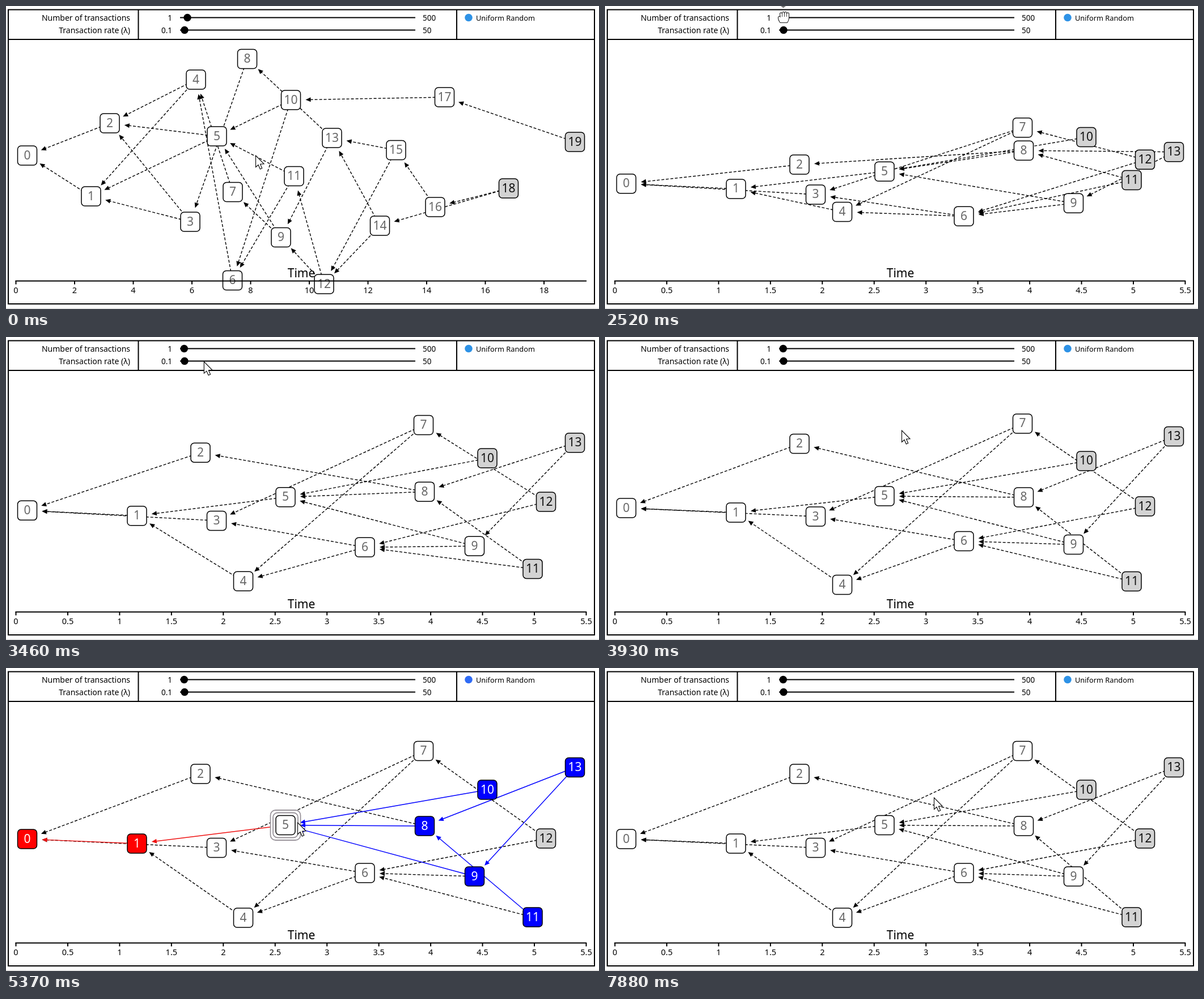
Write an HTML page with a canvas that moves like this. It is 1046 px wide and 535 px high and loops after 7.99 s.

```html
<!DOCTYPE html>
<html lang="en">
<head>
<meta charset="utf-8">
<title>Transaction graph</title>
<style>
html, body { margin: 0; width: 100%; height: 100%; overflow: hidden; background: #fff; }
canvas { display: block; }
</style>
</head>
<body>
<canvas id="stage" width="1046" height="535"></canvas>
<script>
const ctx = document.getElementById('stage').getContext('2d');
const LOOP = 7990, REBUILD = 2370;
const BLACK = '#000', RED = '#ff0000', BLUE = '#0000ff';
const FONT = '"Noto Sans", "Open Sans", sans-serif';

// Parents of each node, by index
const wide = {
  x: [37.5, 150, 183, 325, 335, 372, 399.5, 400, 425.5, 485, 502.5, 508, 561, 575, 659.5, 688, 757, 773.5, 886.5, 1003.5],
  y: [264, 336, 207, 381, 130, 230, 484.5, 328.5, 93.5, 408.5, 166, 300.5, 491, 233, 388, 254.5, 355, 161, 322, 240],
  parents: [[], [0], [0], [1, 2], [1, 2], [1, 2], [4], [4], [3], [5, 7], [5, 6], [5, 6], [9, 11],
    [8, 9], [12, 13], [12, 13], [15], [10], [14, 16], [17]],
  step: 2, count: 10, gap: 103.5
};
const small = {
  x: [37.5, 231, 343, 371.5, 418.5, 493, 633, 736.5, 738.5, 826.5, 849, 929, 952.5, 1003.5],
  parents: [[], [0], [0], [0], [1], [1], [3, 4], [3, 4], [2, 5], [5, 6], [5], [6, 8], [6, 7], [8, 9]],
  step: 0.5, count: 12, gap: 91.45
};
const early = [325, 340, 271, 356, 405, 290.5, 417.5, 166, 231, 380.5, 193, 315, 257, 235];
const late = [302, 310, 188.5, 317, 437.5, 281, 360.5, 153, 283, 366.5, 219, 431.5, 299, 175.5];
const rest = [302, 310, 187, 317.5, 441, 277.5, 362, 146.5, 279, 368, 215, 440, 301, 175.5];

// time, x, y of the pointer tip
const pointerPath = [
  [0, 440, 264], [380, 440, 264], [1160, 332, 38], [1250, 332, 38], [1550, 313, 20],
  [1780, 313, 20], [1800, 313, 21], [1950, 317, 20], [2040, 311, 20], [2110, 311, 20],
  [2370, 315, 20], [3300, 315, 20], [3930, 523, 165], [4120, 523, 165], [4850, 506, 272],
  [5340, 506, 272], [5370, 514, 273], [5460, 514, 273], [6160, 627, 356], [6250, 627, 356],
  [6400, 630, 350], [7470, 630, 350], [7880, 580, 229], [LOOP, 580, 229]
];

const clamp = v => Math.max(0, Math.min(1, v));
const lerp = (a, b, p) => a + (b - a) * p;
const smooth = p => p * p * (3 - 2 * p);
const between = (t, a, b) => clamp((t - a) / (b - a));
const settle = (p, k) => (1 - Math.exp(-k * p)) / (1 - Math.exp(-k));

function pointerAt(t) {
  let i = 1;
  while (i < pointerPath.length - 1 && t > pointerPath[i][0]) i++;
  const a = pointerPath[i - 1], b = pointerPath[i];
  const p = smooth(between(t, a[0], b[0]));
  return [lerp(a[1], b[1], p), lerp(a[2], b[2], p)];
}

function heights(t) {
  if (t < 2900) {
    const p = between(t, REBUILD, 2900);
    return early.map(y => lerp(295 + (y - 295) * 0.4, y, settle(p, 0.8)));
  }
  if (t < 3930) {
    const p = settle(between(t, 2900, 3930), 2.5);
    return early.map((y, i) => lerp(y, late[i], p));
  }
  const p = settle(between(t, 3930, 4850), 2);
  return late.map((y, i) => lerp(y, rest[i], p));
}

function relatives(g, id) {
  const up = new Set(), down = new Set();
  if (id < 0) return { up, down };
  const climb = n => g.parents[n].forEach(p => { up.add(p); climb(p); });
  climb(id);
  g.parents.forEach((ps, n) => {
    if (ps.some(p => p === id || down.has(p))) down.add(n);
  });
  return { up, down };
}

function line(x1, y1, x2, y2, color = BLACK, width = 2) {
  ctx.strokeStyle = color;
  ctx.lineWidth = width;
  ctx.beginPath();
  ctx.moveTo(x1, y1);
  ctx.lineTo(x2, y2);
  ctx.stroke();
}

function text(str, x, y, size, align = 'left', color = BLACK) {
  ctx.font = size + 'px ' + FONT;
  ctx.textAlign = align;
  ctx.fillStyle = color;
  ctx.fillText(str, x, y);
}

function dot(x, y, r, color = BLACK) {
  ctx.fillStyle = color;
  ctx.beginPath();
  ctx.arc(x, y, r, 0, Math.PI * 2);
  ctx.fill();
}

function box(x, y, size, radius, stroke, width, fill) {
  ctx.beginPath();
  ctx.roundRect(x - size / 2, y - size / 2, size, size, radius);
  if (fill) {
    ctx.fillStyle = fill;
    ctx.fill();
  }
  ctx.strokeStyle = stroke;
  ctx.lineWidth = width;
  ctx.stroke();
}

function polygon(points, fill) {
  ctx.beginPath();
  points.forEach(([x, y]) => ctx.lineTo(x, y));
  ctx.closePath();
  ctx.fillStyle = fill;
  ctx.fill();
}

function edge(x1, y1, x2, y2, color) {
  const angle = Math.atan2(y2 - y1, x2 - x1);
  const length = Math.hypot(x2 - x1, y2 - y1) - 26;
  ctx.save();
  ctx.translate(x1, y1);
  ctx.rotate(angle);
  ctx.setLineDash(color === BLACK ? [5, 3] : []);
  line(0, 0, length - 7, 0, color, 1.4);
  polygon([[length, 0], [length - 9, -4], [length - 9, 4]], color);
  ctx.restore();
}

function drawGraph(g, ys, pointer) {
  const hover = g === small
    ? g.x.findIndex((x, i) => Math.abs(pointer[0] - x) < 26 && Math.abs(pointer[1] - ys[i]) < 26)
    : -1;
  const { up, down } = relatives(g, hover);
  const tips = new Set(g.x.keys());
  const edges = [];
  g.parents.forEach((ps, n) => ps.forEach(p => {
    tips.delete(p);
    let color = BLACK;
    if (hover >= 0 && (n === hover || up.has(n))) color = '#ee1212';
    else if (hover >= 0 && (p === hover || down.has(p))) color = BLUE;
    edges.push([n, p, color]);
  }));
  edges.sort((a, b) => (b[2] === BLACK) - (a[2] === BLACK));
  edges.forEach(([n, p, color]) => edge(g.x[n], ys[n], g.x[p], ys[p], color));

  g.x.forEach((x, n) => {
    let fill = '#fff', ink = '#666';
    if (up.has(n)) [fill, ink] = [RED, '#fff'];
    else if (down.has(n)) [fill, ink] = [BLUE, '#fff'];
    else if (tips.has(n)) [fill, ink] = ['#d3d3d3', '#111'];
    if (n === hover) {
      box(x, ys[n], 53, 9, '#99939a', 1.8, '#fff');
      box(x, ys[n], 44, 8, '#99939a', 1.8);
    }
    box(x, ys[n], 34, 6, BLACK, 1.5, fill);
    text(n, x, ys[n] + 6.5, 21, 'center', ink);
  });
  return hover;
}

function drawAxis(g) {
  line(16.5, 485.5, 1024, 485.5);
  for (let i = 0; i < g.count; i++) {
    const x = 17.5 + i * g.gap;
    line(x, 485, x, 491.5);
    text(i * g.step, x, 507, 14.5, 'center');
  }
  text('Time', 521, 478.5, 21, 'center');
}

function drawHeader(knobX, dotColor) {
  ctx.strokeStyle = BLACK;
  ctx.lineWidth = 2;
  ctx.strokeRect(4, 6.5, 1034, 519.5);
  line(4, 59, 1038, 59);
  line(233.5, 6, 233.5, 59);
  line(795, 6, 795, 59);
  line(0, 534, 1046, 534, '#ccc', 1);
  text('Number of transactions', 219, 25.5, 14, 'right');
  text('Transaction rate (λ)', 219, 47.5, 14, 'right');
  [['1', '500', 20.5, knobX], ['0.1', '50', 42.5, 315]].forEach(([min, max, y, x]) => {
    text(min, 293, y + 5, 13.5, 'right');
    line(307, y, 722, y);
    dot(x, y, 6.7);
    text(max, 735, y + 5, 13.5);
  });
  dot(816, 20.5, 6.8, dotColor);
  text('Uniform Random', 829, 26, 12.8);
}

function drawArrow([x, y]) {
  ctx.save();
  ctx.translate(x, y);
  polygon([[0.5, 0], [0.5, 20.5], [5, 16.5], [8.3, 24], [11.7, 22.5], [8.5, 15.2], [15, 14.8]], '#fff');
  ctx.strokeStyle = BLACK;
  ctx.lineWidth = 1.1;
  ctx.stroke();
  ctx.restore();
}

function drawHand([x, y]) {
  ctx.save();
  ctx.translate(x, y);
  ctx.beginPath();
  ctx.moveTo(-6, 9.5);
  ctx.quadraticCurveTo(-10, 4, -9.5, 0);
  ctx.quadraticCurveTo(-8.5, -3, -6, -1);
  ctx.lineTo(-6.5, -6);
  for (let i = 0; i < 4; i++) {
    const left = -6.5 + i * 4;
    const top = i === 0 || i === 3 ? -9 : -11;
    ctx.bezierCurveTo(left, top, left + 4, top, left + 4, -6);
  }
  ctx.lineTo(9.5, 2);
  ctx.quadraticCurveTo(9, 6, 6.5, 9.5);
  ctx.closePath();
  ctx.fillStyle = '#fff';
  ctx.fill();
  ctx.strokeStyle = '#222';
  ctx.lineWidth = 1.1;
  ctx.stroke();
  for (let i = 0; i < 3; i++) line(-2.5 + i * 4, -6, -2.5 + i * 4, -1, '#444', 1);
  ctx.restore();
}

function draw(t) {
  const pointer = pointerAt(t);
  const g = t < REBUILD ? wide : small;
  const ys = g === wide ? wide.y : heights(t);
  const gripping = t >= 1950 && t < 3320;
  ctx.fillStyle = '#fff';
  ctx.fillRect(0, 0, 1046, 535);
  const hover = drawGraph(g, ys, pointer);
  drawAxis(g);
  const dotColor = hover === 5 ? '#2f6bf5' : hover === 6 ? '#4040ff' : '#2e92e6';
  drawHeader(lerp(320, 314.3, between(t, 1950, 2110)), dotColor);
  if (t >= REBUILD && t < 3320) polygon([[310, 0], [319, 0], [314.5, 3.5]], '#777');
  (gripping ? drawHand : drawArrow)(pointer);
}

const start = performance.now();
function tick() {
  draw((performance.now() - start) % LOOP);
  requestAnimationFrame(tick);
}
tick();
</script>
</body>
</html>
```
